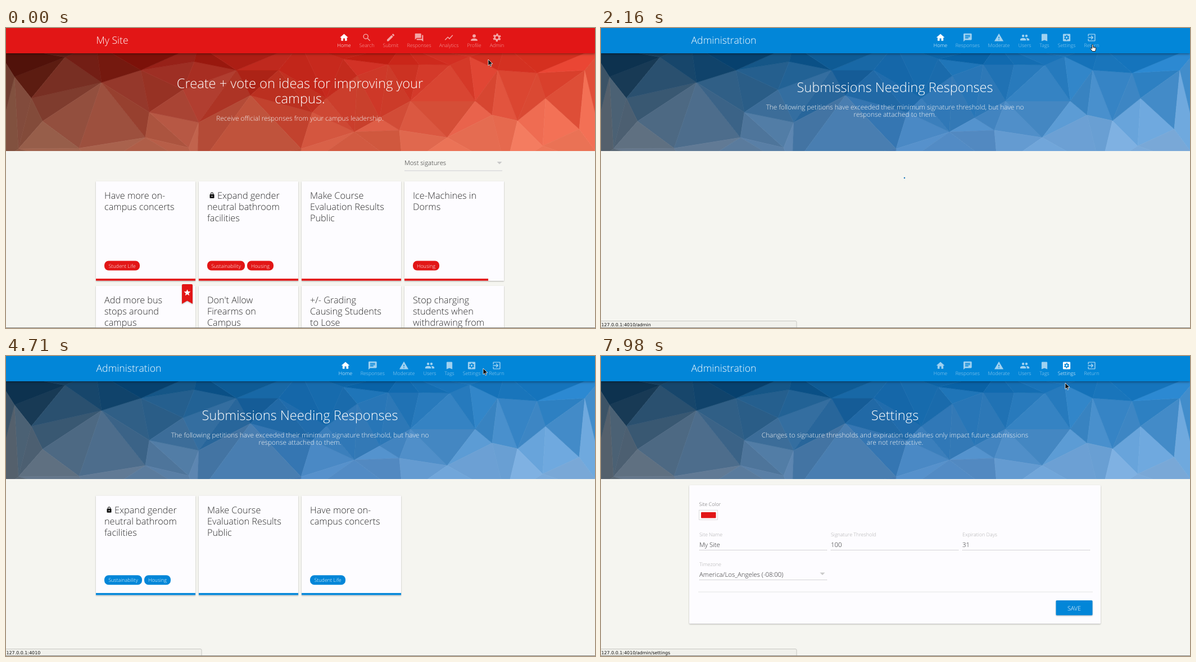
Write an HTML page that moves like this. It is 1048 by 534 pixels and loops after 8000 ms.

```html
<!DOCTYPE html>
<html lang="en">
<head>
<meta charset="utf-8">
<title>Campus petitions</title>
<style>
html, body { margin: 0; width: 100%; height: 100%; overflow: hidden; background: #f5f5f0; }
svg { display: block; width: 100%; height: 100%; }
text { font-family: "Open Sans", sans-serif; font-weight: 300; text-rendering: geometricPrecision; white-space: pre; }
.mid { text-anchor: middle; }
.card { filter: drop-shadow(0 1px 1px rgba(0,0,0,.28)); }
#url { font: 7.95px "DejaVu Sans", sans-serif; }
</style>
</head>
<body>
<svg id="stage" viewBox="0 0 1048 534"></svg>
<script>
const RED = '#e21616', BLUE = '#0286d8', INK = '#2c2c2c';

// Icons on a 24-unit grid
const gear = color => `<g fill="none" stroke="${color}"><circle cx="12" cy="12" r="5.3" stroke-width="3.6"/>
  <circle cx="12" cy="12" r="8.2" stroke-width="3.2" pathLength="12" stroke-dasharray="1 1" stroke-dashoffset="-.5"/></g>`;
const shape = d => `<path fill-rule="evenodd" d="${d}"/>`;
const icons = {
  home: shape('M10 20v-6h4v6h5v-8h3L12 3 2 12h3v8z'),
  search: '<g fill="none" stroke="#fff" stroke-width="2"><circle cx="9.5" cy="9.5" r="5.5"/><path d="M13.7 13.7l6 6"/></g>',
  edit: shape('M3 17.25V21h3.75L17.8 9.94l-3.75-3.75zM20.7 7.04a1 1 0 0 0 0-1.41l-2.34-2.34a1 1 0 0 0-1.41 0l-1.83 1.83 3.75 3.75z'),
  forum: shape('M21 6h-2v9H6v2q0 1 1 1h11l4 4V7q0-1-1-1zM17 12V3q0-1-1-1H3q-1 0-1 1v14l4-4h10q1 0 1-1z'),
  chart: shape('M3.5 18.5l6-6 4 4L22 6.9l-1.4-1.4-7.1 8-4-4L2 17z'),
  person: shape('M12 12a4 4 0 1 0 0-8 4 4 0 0 0 0 8zM12 14c-2.7 0-8 1.3-8 4v2h16v-2c0-2.7-5.3-4-8-4z'),
  gear: gear('#fff'),
  chat: shape('M20 2H4a2 2 0 0 0-2 2v18l4-4h14a2 2 0 0 0 2-2V4a2 2 0 0 0-2-2zM6 9h12v2H6zM6 12h8v2H6zM6 6h12v2H6z'),
  warning: shape('M1 21h22L12 2zM11 16h2v2h-2zM11 10h2v4h-2z'),
  people: shape('M16 11a3 3 0 1 0 0-6 3 3 0 0 0 0 6zM8 11a3 3 0 1 0 0-6 3 3 0 0 0 0 6zM8 13c-2.3 0-7 1.2-7 3.5V19h14v-2.5C15 14.2 10.3 13 8 13zM16 13l-1 .1c1.2.8 2 1.9 2 3.4V19h6v-2.5c0-2.3-4.7-3.5-7-3.5z'),
  bookmark: shape('M17 3H7a2 2 0 0 0-2 2v16l7-3 7 3V5a2 2 0 0 0-2-2z'),
  gearBox: `<rect x="3" y="3" width="18" height="18" rx="2"/><g transform="translate(4.2 4.2) scale(.65)">${gear(BLUE)}</g>`,
  exit: shape('M10 15.6l1.5 1.4 5-5-5-5L10 8.4l2.6 2.6H3v2h9.6zM19 3H5a2 2 0 0 0-2 2v4h2V5h14v14H5v-4H3v4a2 2 0 0 0 2 2h14a2 2 0 0 0 2-2V5a2 2 0 0 0-2-2z'),
  lock: shape('M18 8h-1V6A5 5 0 0 0 7 6v2H6a2 2 0 0 0-2 2v10a2 2 0 0 0 2 2h12a2 2 0 0 0 2-2V10a2 2 0 0 0-2-2zM9 8V6a3 3 0 0 1 6 0v2zM12 17a2 2 0 1 1 0-4 2 2 0 0 1 0 4z'),
  star: shape('M12 17.3L18.2 21l-1.7-7L22 9.2l-7.2-.6L12 2 9.2 8.6 2 9.2 7.5 14 5.8 21z')
};
const icon = (name, cx, cy, size, fill = '#fff') =>
  `<g fill="${fill}" transform="translate(${cx - size / 2} ${cy - size / 2}) scale(${size / 24})">${icons[name]}</g>`;
const text = (x, y, size, str, fill = INK, cls = '') =>
  `<text x="${x}" y="${y}" font-size="${size}" fill="${fill}" class="${cls}">${str}</text>`;
const rect = (x, y, w, h, fill, more = '') =>
  `<rect x="${x}" y="${y}" width="${w}" height="${h}" fill="${fill}" ${more}/>`;
const line = (x1, x2, y, color, more = '') =>
  `<path d="M${x1} ${y}H${x2}" stroke="${color}" stroke-width=".8" ${more}/>`;
const arrowDown = (x, y) => `<path d="M${x} ${y}h9l-4.5 4.5z" fill="#c9c9c9"/>`;

// Low-poly banner: Delaunay triangles over loose points
const points = `15 87 45 125 65 166 170 97 105 52 22 215 130 214 240 75 255 150 248 195 343 168 325 213
  335 60 315 110 435 120 410 75 525 215 545 150 485 75 620 185 570 125 625 85 600 55 680 65 665 160
  700 182 785 195 720 130 735 65 790 66 825 51 835 130 875 75 865 155 910 165 955 210 960 125 945 80
  1020 180 1030 75`.trim().split(/\s+/).map(Number)
  .reduce((list, n, i) => (i % 2 ? list[list.length - 1].push(n) : list.push([n]), list), []);
for (let i = 0; i <= 6; i++) points.push([i * 182 - 22, 28 + i % 3], [i * 183 - 26, 250 + i % 2 * 3]);

function circumcircle([ax, ay], [bx, by], [cx, cy]) {
  const d = 2 * (ax * (by - cy) + bx * (cy - ay) + cx * (ay - by));
  if (Math.abs(d) < 1e-6) return null;
  const a = ax * ax + ay * ay, b = bx * bx + by * by, c = cx * cx + cy * cy;
  const x = (a * (by - cy) + b * (cy - ay) + c * (ay - by)) / d;
  const y = (a * (cx - bx) + b * (ax - cx) + c * (bx - ax)) / d;
  return [x, y, Math.hypot(ax - x, ay - y)];
}
const triangles = [];
points.forEach((a, i) => points.slice(i + 1).forEach((b, j) => points.slice(i + j + 2).forEach(c => {
  const o = circumcircle(a, b, c);
  if (o && points.every(p => Math.hypot(p[0] - o[0], p[1] - o[1]) > o[2] - 1e-6)) triangles.push([a, b, c]);
})));

const mix = (a, b, k) => a.map((v, i) => v + (b[i] - v) * k);
const ramp = (stops, u) => u < .5 ? mix(stops[0], stops[1], u * 2) : mix(stops[1], stops[2], u * 2 - 1);
const clamp = v => Math.max(0, Math.min(1, v));
function banner(top, bottom) {
  let seed = 7;
  return triangles.map(t => {
    const u = clamp((t[0][0] + t[1][0] + t[2][0]) / 3144);
    const v = clamp(((t[0][1] + t[1][1] + t[2][1]) / 3 - 55) / 150);
    seed = seed * 16807 % 2147483647;
    const shade = (seed / 2147483647 - .5) * 22;
    const color = `rgb(${mix(ramp(top, u), ramp(bottom, u), v).map(c => Math.round(clamp((c + shade) / 255) * 255))})`;
    return `<path d="M${t.join('L')}z" fill="${color}" stroke="${color}" stroke-width=".6"/>`;
  }).join('');
}
const redBanner = banner([[78, 22, 14], [192, 30, 20], [224, 58, 40]], [[144, 98, 78], [206, 86, 62], [246, 126, 96]]);
const blueBanner = banner([[18, 52, 78], [12, 98, 164], [30, 126, 200]], [[102, 110, 120], [74, 134, 194], [134, 180, 226]]);

// Page parts
const header = (color, brand, items, active) =>
  rect(0, 0, 1048, 45, color, 'style="filter:drop-shadow(0 1px 2px rgba(0,0,0,.45))"') +
  text(160.5, 28, 17.7, brand, '#fff') +
  items.map(([name, label, x]) => `<g opacity="${label === active ? 1 : .62}">` +
    icon(name, x, 17, 17.6) + text(x, 34, 8.9, label, '#fff', 'mid') + '</g>').join('');
const hero = (art, titles, titleY, subs, subY) =>
  `<g clip-path="url(#heroClip)">${art}</g>` +
  titles.map((s, i) => text(523, titleY + i * 27, 23.65, s, '#fff', 'mid')).join('') +
  subs.map((s, i) => text(523, subY + i * 13.4, 11.85, s, '#f4f4f4', 'mid')).join('');

const tagWidth = { 'Student Life': 63, Sustainability: 67, Housing: 47 };
function card(x, y, color, title, { tags = [], locked, starred, done = 1 } = {}) {
  let tagX = x + 15;
  return `<g class="card">${rect(x, y, 177, 177, '#fdfcff')}</g>` +
    rect(x, y + 173.2, 177 * done, 3.6, color) +
    (locked ? icon('lock', x + 23.5, y + 25, 12, '#111') : '') +
    title.split('|').map((s, i) => text(x + 15 + (locked && !i ? 18 : 0), y + 31 + i * 20, 16.25, s)).join('') +
    tags.map(tag => {
      const w = tagWidth[tag], at = tagX;
      tagX += w + 4;
      return rect(at, y + 141.5, w, 17, color, 'rx="7.5"') + text(at + w / 2, y + 153.5, 8.95, tag, '#fff', 'mid');
    }).join('') +
    (starred ? `<path class="card" d="M${x + 153} ${y - 1}q0-2 2-2h15q2 0 2 2v33l-9.5-5.5-9.5 5.5z" fill="${color}"/>` +
      icon('star', x + 162.5, y + 12, 14) : '');
}
const column = i => 160 + 183 * i;

const concerts = ['Have more on-|campus concerts', { tags: ['Student Life'] }];
const bathrooms = ['Expand gender|neutral bathroom|facilities', { tags: ['Sustainability', 'Housing'], locked: true }];
const courses = ['Make Course|Evaluation Results|Public'];
const cards = (list, y, color) => list.map((c, i) => card(column(i), y, color, ...c)).join('');

const siteNav = [['home', 'Home', 601.5], ['search', 'Search', 642], ['edit', 'Submit', 684.5], ['forum', 'Responses', 735],
  ['chart', 'Analytics', 788], ['person', 'Profile', 833], ['gear', 'Admin', 873.5]];
const adminNav = [['home', 'Home', 604], ['chat', 'Responses', 652.3], ['warning', 'Moderate', 708], ['people', 'Users', 754],
  ['bookmark', 'Tags', 789], ['gearBox', 'Settings', 828.5], ['exit', 'Return', 873]];

const home = hero(redBanner, ['Create + vote on ideas for improving your', 'campus.'], 107,
    ['Receive official responses from your campus leadership.'], 164.5) +
  header(RED, 'My Site', siteNav, 'Home') +
  text(709, 244, 11.3, 'Most sigatures') + arrowDown(873.5, 238) + line(709, 883, 254, '#c4c4cc') +
  cards([concerts, bathrooms, courses, ['Ice-Machines in|Dorms', { tags: ['Housing'], done: .842 }]], 273, RED) +
  cards([['Add more bus|stops around|campus', { starred: true }], ["Don't Allow|Firearms on|Campus"],
    ['+/- Grading|Causing Students|to Lose'], ['Stop charging|students when|withdrawing from']], 459, RED);

const admin = hero(blueBanner, ['Submissions Needing Responses'], 114,
    ['The following petitions have exceeded their minimum signature threshold, but have no', 'response attached to them.'], 145) +
  header(BLUE, 'Administration', adminNav, 'Home') +
  `<g id="petitions">${cards([bathrooms, courses, concerts], 248.7, BLUE)}</g>
  <circle id="spinner" cx="523" cy="266" r="17" fill="none" stroke="#0a70b8" stroke-width="2.2" pathLength="360"/>`;

const field = (x, y, label, value) => text(x, y, 8.95, label, '#aaa') + text(x, y + 18.5, 11.4, value) +
  line(x, x + 228, y + 24.5, '#999', 'stroke-dasharray="1 1"');
const settings = hero(blueBanner, ['Settings'], 114,
    ['Changes to signature thresholds and expiration deadlines only impact future submissions', 'are not retroactive.'], 145) +
  header(BLUE, 'Administration', adminNav, 'Settings') +
  `<g class="card">${rect(157, 230, 732, 246.5, '#fdfcff', 'rx="1.5"')}</g>` +
  text(174.5, 267, 8.95, 'Site Color', '#666') +
  rect(174.5, 274.5, 33, 17, '#fff', 'stroke="#d4d4d4" stroke-width=".8"') + rect(178, 278, 26.5, 10.5, RED, 'rx="1"') +
  field(175, 321, 'Site Name', 'My Site') + field(409, 321, 'Signature Threshold', '100') +
  field(643, 321, 'Expiration Days', '31') + field(175, 374, 'Timezone', 'America/Los_Angeles (-08:00)') +
  arrowDown(389.5, 385.5) + line(173, 875, 420, '#dcdcdc') +
  `<g class="card">${rect(809.5, 435, 65, 26.5, BLUE, 'rx="1.5"')}</g>` + text(842, 452.5, 10.8, 'SAVE', '#fff', 'mid');

const stage = document.getElementById('stage');
stage.innerHTML = `<clipPath id="heroClip"><rect y="44" width="1048" height="175"/></clipPath>
  ${rect(0, 0, 1048, 534, '#f5f5f0')}
  <g id="home">${home}</g><g id="admin">${admin}</g><g id="settings">${settings}</g>
  <g id="status"><path d="M-1 521.5H346q2 0 2 2V534H-1z" fill="#f1f1ec" stroke="#bdbdb8" stroke-width=".8"/>
    <text id="url" x=".5" y="531" fill="#111"></text></g>
  ${rect(0, 533, 1048, 1, '#858582')}
  <g id="ring" fill="none"><circle r="22" stroke="#fff" stroke-opacity=".7" stroke-width="3.2"/>
    <circle r="22" stroke="#111" stroke-width="1.6"/></g>
  <path id="arrow" d="M0 0V11L2.6 8.7 4.2 12.4 6 11.6 4.4 7.9H8z" fill="#000" stroke="#fff" stroke-width=".8"/>
  <g id="hand" fill="#fff" stroke="#111" stroke-width=".9" stroke-linejoin="round">
    <path d="M-1 .8a1 1 0 0 1 2 0V4l4 .9q1.4.4 1.2 2L5.6 9.5 5 12H-.2L-3.6 7.6q-.6-1.4.6-1.6L-1 7.2z"/>
    <path d="M1 4v2M2.7 4.5V6.4M4.4 5V6.8" stroke-width=".7"/></g>`;

const $ = id => document.getElementById(id);
const show = (id, on) => $(id).style.display = on ? '' : 'none';
const between = (t, a, b) => t >= a && t < b;

// Pointer stops: time, x, y
const stops = [[0, 858, 56], [250, 858, 56], [900, 874.5, 29.5], [4300, 874.5, 29.5], [4700, 849, 22],
  [4850, 849, 22], [5250, 836.5, 22.5], [6900, 836.5, 22.5], [7600, 826, 48], [8000, 826, 48]];
function pointer(t) {
  const i = stops.findIndex(s => s[0] > t), a = stops[i - 1], b = stops[i];
  const k = (t - a[0]) / (b[0] - a[0]), e = k * k * (3 - 2 * k);
  return mix(a, b, e).slice(1);
}

function draw() {
  const t = performance.now() % 8000;
  show('home', t < 1950);
  show('admin', between(t, 1950, 6180));
  show('settings', t >= 6180);
  show('petitions', t >= 2650);

  const spin = t - 2150, wave = (1 - Math.cos(spin / 1333 * 2 * Math.PI)) / 2;
  show('spinner', between(spin, 0, 500));
  $('spinner').setAttribute('stroke-dasharray', `${7 + 260 * wave} 360`);
  $('spinner').setAttribute('transform', `rotate(${Math.max(0, spin) * .23 - 3} 523 266)`);

  show('status', t >= 720);
  $('url').textContent = '127.0.0.1:4010' + (t < 4380 ? '/admin' : t < 5080 ? '' : '/admin/settings');

  const at = `translate(${pointer(t)})`;
  const hand = between(t, 660, 4560) || between(t, 5020, 7280);
  show('hand', hand);
  show('arrow', !hand);
  show('ring', between(t, 1590, 1860) || between(t, 5790, 6060));
  for (const id of ['hand', 'arrow', 'ring']) $(id).setAttribute('transform', at);
  requestAnimationFrame(draw);
}
draw();
</script>
</body>
</html>
```
